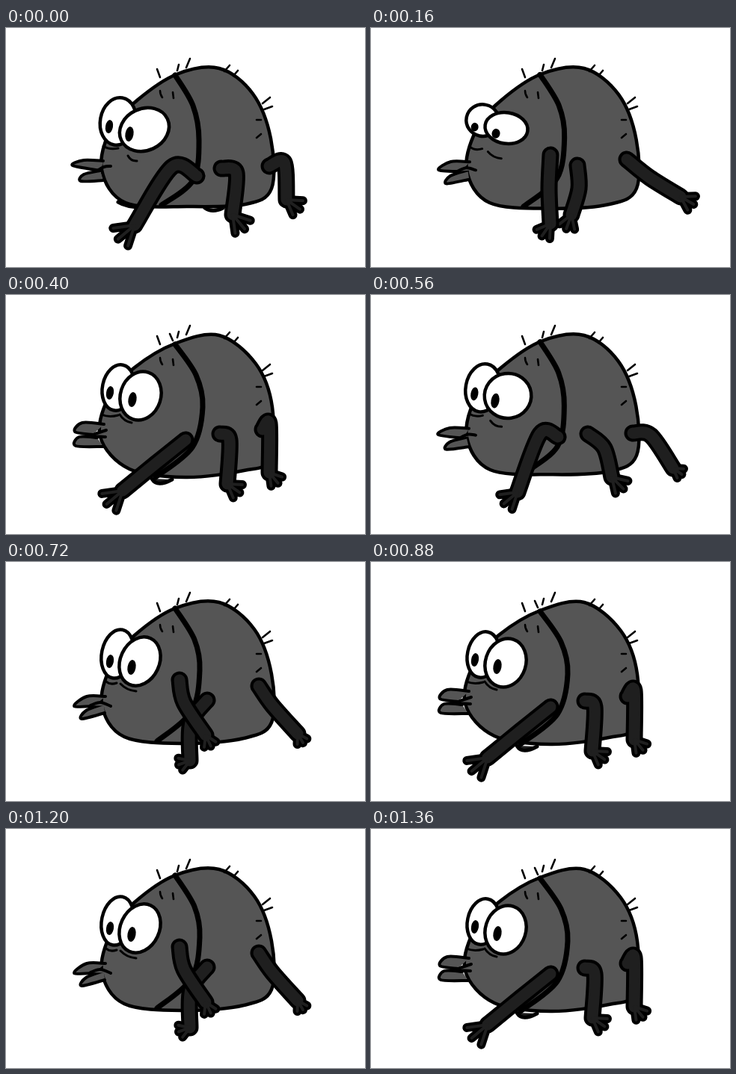
An HTML page with a canvas for the animation above (1440 ms loop, 480 by 320 pixels).

```html
<!DOCTYPE html>
<html>
<head>
<meta charset="utf-8">
<style>
html, body { margin: 0; width: 100%; height: 100%; overflow: hidden; background: #fff }
canvas { display: block }
</style>
</head>
<body>
<canvas id="stage" width="480" height="320"></canvas>
<script>
const ctx = document.getElementById('stage').getContext('2d');
const GREY = '#555', DARK = '#1f1f1f', INK = '#000';

// Outlines are x y pairs; an eye is x y rx ry angle.
const reach = {
  body: [128,190, 140,135, 175,97, 228,62, 285,54, 330,88, 354,148, 355,215, 320,236, 245,239, 160,234],
  strap: [226,63, 250,104, 258,150, 250,204, 208,237],
  upper: [130,178, 104,177, 89,184, 127,191],
  lower: [126,191, 104,196, 100,205, 130,204],
  corner: [122,191, 131,186, 140,185],
  bags: [130,158, 150,161, 163,171, 175,178],
  left: [150,125, 24,32,10], right: [185,136, 34,28,-25],
  pupils: [138,132, 165,142]
};
const tuck = {
  body: [128,190, 142,135, 172,98, 226,62, 285,54, 332,90, 355,150, 355,215, 318,236, 240,243, 158,234],
  strap: [226,62, 252,104, 259,145, 248,200, 202,240],
  upper: [133,180, 108,180, 91,193, 117,193],
  lower: [131,190, 107,199, 101,210, 132,202],
  corner: [113,192, 126,188, 140,193],
  bags: [134,160, 148,162, 153,163, 174,173],
  left: [149,123, 21,33,12], right: [179,133, 26,34,25],
  pupils: [139,133, 168,141]
};
const stretch = {
  body: [126,190, 138,135, 172,97, 226,65, 285,54, 334,92, 356,150, 352,220, 318,235, 240,244, 165,233],
  strap: [226,66, 254,107, 263,150, 249,204, 200,244],
  upper: [131,173, 102,171, 92,183, 116,187],
  lower: [122,191, 98,190, 93,202, 130,203],
  corner: [134,181, 115,188, 133,190],
  bags: [128,160, 150,161, 152,160, 168,171],
  left: [150,124, 21,31,12], right: [180,135, 27,33,18],
  pupils: [139,131, 169,140]
};

// Per pose: hip, knee, ankle, foot angle, toe length.
const back = [
  [352,185, 372,180, 375,230, 35,22], [350,185, 374,188, 404,232, 35,14],
  [342,176, 372,200, 414,226, 30,20], [338,166, 356,192, 390,230, 60,14],
  [342,176, 362,195, 368,236, 45,14], [343,180, 352,172, 352,238, 50,18]
];
const middle = [
  [288,188, 308,194, 303,250, 50,25], [290,186, 312,205, 322,244, 45,22],
  [276,184, 278,215, 268,250, 110,20], [269,185, 247,215, 246,266, 160,16],
  [280,186, 284,220, 276,256, 100,18], [286,186, 299,194, 296,253, 35,20]
];
const front = [
  [255,198, 222,186, 172,264, 140,29], [250,190, 226,186, 196,264, 140,24],
  [240,170, 238,215, 240,262, 125,20], [232,158, 238,188, 267,232, 65,16],
  [236,176, 216,208, 192,246, 140,22], [240,194, 200,226, 156,262, 140,28]
];
const hairs = [
  'M202 55l4 11M231 49l-2 8M246 41l-5 12M299 50l-7 8M310 57l-6 7M353 93l-10 8M356 105l-11 4',
  'M206 84q0 5 3 9M223 86l1 8M335 123l6 0M335 147l6-5'
].join('');

const mix = (a, b, t) => a.map((n, i) => n + (b[i] - n) * t);
const blend = (a, b, t) =>
  Object.fromEntries(Object.keys(a).map(key => [key, mix(a[key], b[key], t)]));
const poses = [
  reach, blend(reach, tuck, 1 / 3), blend(reach, tuck, 2 / 3),
  tuck, blend(tuck, stretch, 1 / 2), stretch
];

function paint(path, width, fill) {
  if (fill) {
    ctx.fillStyle = fill;
    ctx.fill(path);
  }
  ctx.strokeStyle = INK;
  ctx.lineWidth = width;
  if (width) ctx.stroke(path);
}

// Smooth curve that passes through every point.
function curve(flat, closed) {
  const path = new Path2D(), count = flat.length / 2;
  const at = i => {
    const k = closed ? (i + count) % count : Math.max(0, Math.min(count - 1, i));
    return [flat[2 * k], flat[2 * k + 1]];
  };
  path.moveTo(...at(0));
  for (let i = 0; i < (closed ? count : count - 1); i++) {
    const [p, a, b, n] = [at(i - 1), at(i), at(i + 1), at(i + 2)];
    path.bezierCurveTo(
      a[0] + (b[0] - p[0]) / 6, a[1] + (b[1] - p[1]) / 6,
      b[0] - (n[0] - a[0]) / 6, b[1] - (n[1] - a[1]) / 6, ...b);
  }
  return path;
}

function oval([x, y, rx, ry, angle], fill, width, squash = 1) {
  const path = new Path2D();
  path.ellipse(x, y, rx, ry * squash, angle * Math.PI / 180, 0, 7);
  paint(path, width, fill);
}

function drawLeg([hipX, hipY, kneeX, kneeY, x, y, angle, length]) {
  const limb = curve([hipX, hipY, kneeX, kneeY, x, y]);
  const toes = new Path2D();
  for (const spread of [-32, 0, 32]) {
    const turn = (angle + spread) * Math.PI / 180;
    toes.moveTo(x, y);
    toes.lineTo(x + length * Math.cos(turn), y + length * Math.sin(turn));
  }
  for (const [colour, inset] of [[INK, 0], [DARK, 8]]) {
    ctx.strokeStyle = colour;
    ctx.lineWidth = 23 - inset;
    ctx.stroke(limb);
    ctx.lineWidth = 12 - inset;
    ctx.stroke(toes);
  }
}

function drawEyes(pose, lid) {
  if (lid === 1) {
    oval([128, 135, 23, 10, 8], GREY, 4.5);
    oval([180, 145, 32, 11, 6], GREY, 4.5);
    paint(new Path2D('M107 134L149 138M150 142Q180 142 209 149'), 3.5);
    paint(new Path2D('M127 153Q142 153 151 149Q158 164 168 168'), 2.5);
    return;
  }
  const squash = 1 - lid * 0.7;
  [pose.left, pose.right].forEach((eye, i) => {
    const [x, y] = pose.pupils.slice(2 * i);
    oval(eye, '#fff', 4.5, squash);
    oval([x, y, 5 + i * 0.5, 9 + i, 10], INK, 0, squash);
  });
  for (const i of [0, 4]) {
    const [x, y, endX, endY] = pose.bags.slice(i);
    paint(new Path2D(`M${x} ${y}Q${(x + endX) / 2 - 2} ${(y + endY) / 2 + 4} ${endX} ${endY}`), 3);
  }
}

function render(step) {
  const phase = step % 6, pose = poses[phase];
  const lid = { 2: 0.5, 3: 1, 4: 0.5 }[step] || 0;
  ctx.fillStyle = '#fff';
  ctx.fillRect(0, 0, 480, 320);
  if (phase === 0) paint(new Path2D('M266 241Q276 248 290 241M150 233Q165 242 195 239'), 5);
  if (phase === 5) paint(new Path2D('M195 246Q202 258 222 247'), 5, DARK);
  paint(curve(pose.body, true), 4.5, GREY);
  for (const part of ['upper', 'lower', 'corner']) paint(curve(pose[part]), 4, GREY);
  paint(curve(pose.strap), 7);
  paint(new Path2D(hairs), 2.6);
  if (phase === 5) paint(new Path2D('M219 52l4 9'), 2.6);
  drawEyes(pose, lid);
  for (const leg of [back, middle, front]) drawLeg(leg[phase]);
}

ctx.lineCap = ctx.lineJoin = 'round';
function tick() {
  render(Math.floor(performance.now() % 1440 / 80));
  requestAnimationFrame(tick);
}
tick();
</script>
</body>
</html>
```
